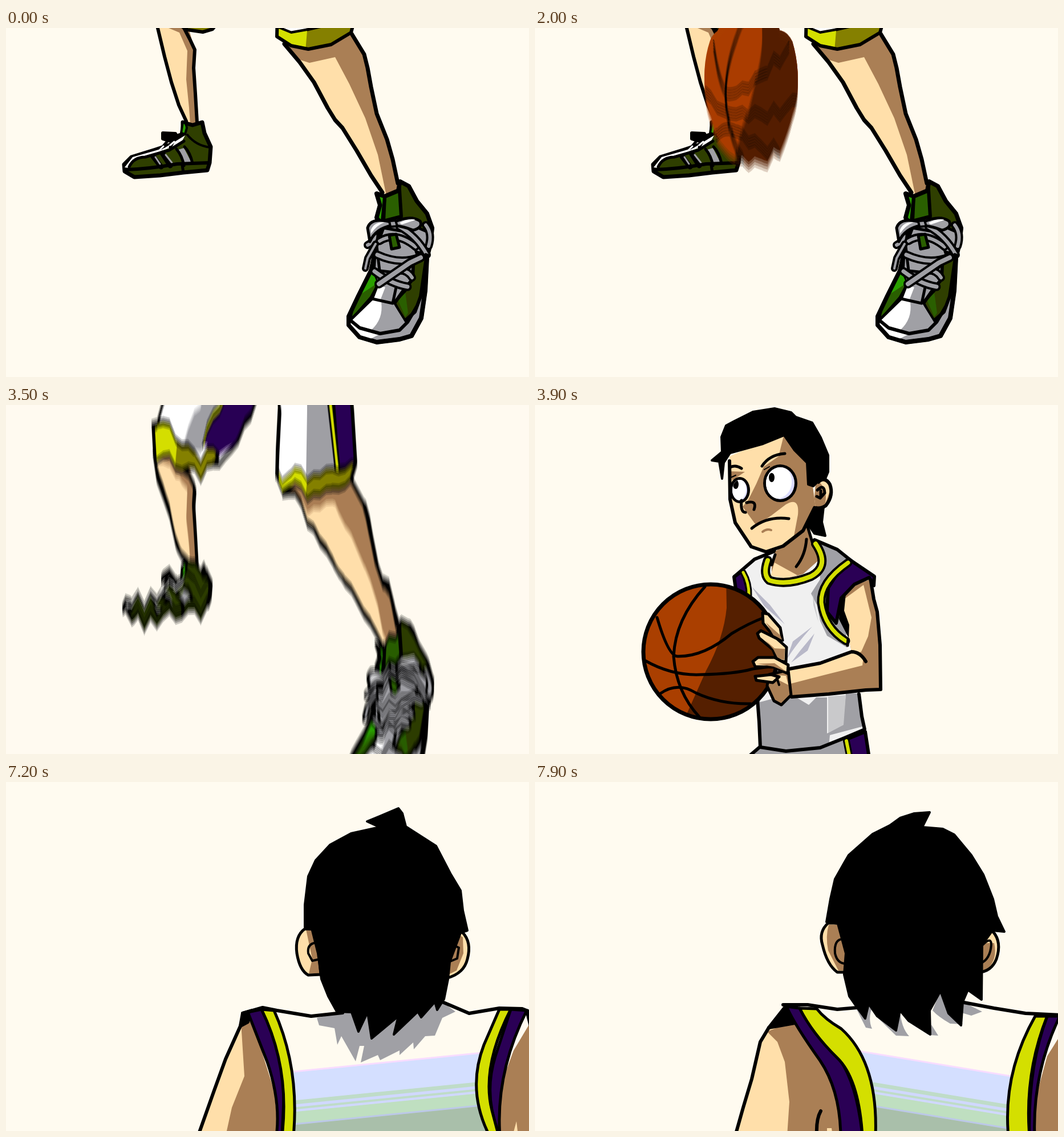
Recreate the animation shown at these times as an HTML page with a canvas. Size 917x611 px, loop 8000 ms.

```html
<!DOCTYPE html>
<html lang="en">
<head>
<meta charset="utf-8">
<title>Dribble</title>
<style>
html, body { margin: 0; width: 100%; height: 100%; overflow: hidden; background: #fffbf0; }
canvas { display: block; width: 100vw; height: 100vh; }
</style>
</head>
<body>
<canvas id="stage" width="917" height="611"></canvas>
<script>
const W = 917, H = 611, PAD = 60, LOOP = 8000, CLIMB = 1000;
const PAPER = "#fffbf0", INK = "#000", SKIN = "#ffdfaa", TAN = "#aa7f55",
  LIME = "#d4df00", OLIVE = "#858000", PURPLE = "#2a0055", GREY = "#a0a0a5",
  MOSS = "#2f3f00", LEAF = "#2a5f00", GRASS = "#2a9f00", RUST = "#aa3f00",
  BROWN = "#551f00", CLOTH = "#f0f0f0", LILAC = "#dcdcff";

const screen = document.getElementById("stage").getContext("2d");
const sheet = document.createElement("canvas");
sheet.width = W;
sheet.height = H + 2 * PAD;
const sheetPen = sheet.getContext("2d");
let g = screen;

function line(d, width = 6, color = INK) {
  g.lineJoin = g.lineCap = "round";
  g.lineWidth = width;
  g.strokeStyle = color;
  g.stroke(new Path2D(d));
}
function flat(d, color) {
  g.fillStyle = color;
  g.fill(new Path2D(d));
}
function shape(d, color, width = 6) {
  flat(d, color);
  line(d, width);
}
function band(d, color, width, edge = 5) {
  line(d, width + 2 * edge);
  line(d, width, color);
}
function oval(x, y, rx, ry, color) {
  g.beginPath();
  g.ellipse(x, y, rx, ry, 0, 0, 7);
  g.fillStyle = color;
  g.fill();
}
function within(d, draw) {
  g.save();
  g.clip(new Path2D(d));
  draw();
  g.restore();
}
function rand(n) {
  const v = Math.sin(n * 127.1 + 11.7) * 43758.5453;
  return v - Math.floor(v);
}

// Vertical speed blur with a ragged edge.
function smear(draw, amp, blur, seed) {
  sheetPen.clearRect(0, 0, W, sheet.height);
  g = sheetPen;
  g.save();
  g.translate(0, PAD);
  draw();
  g.restore();
  g = screen;
  for (let k = 0; k < 5; k++) {
    g.globalAlpha = 1 / (k + 1);
    for (let x = 0; x < W; x++) {
      const cell = Math.floor(x / 11), f = x / 11 - cell;
      const a = rand(cell + seed), b = rand(cell + 1 + seed);
      const y = ((a + (b - a) * f) * 2 - 1) * amp + (k / 2 - 1) * blur;
      g.drawImage(sheet, x, 0, 1, sheet.height, x, y - PAD, 1, sheet.height);
    }
  }
  g.globalAlpha = 1;
}

function shorts() {
  const left = "M395 -400 L330 -250 L268 -100 L258 -82 L261 -32 L296 -10 L318 3 L345 7 L362 2 L405 -50 L437 -118 L460 -190 L470 -400 Z";
  flat(left, "#fff");
  within(left, () => {
    flat("M395 -330 L372 -118 L345 -50 L325 -15 L310 -40 L340 -118 Z", GREY);
    flat("M440 -400 L378 -118 L345 -48 L358 -20 L405 -50 L480 -200 Z", PURPLE);
    line("M430 -300 L378 -118 L347 -48", 8);
    line("M430 -300 L378 -118 L347 -48", 3, LIME);
    shape("M262 -98 L300 -56 L330 -24 L372 -28 L360 30 L250 0 Z", OLIVE, 5);
    flat("M263 -92 L300 -52 L296 -8 L261 -32 L258 -75 Z", LIME);
  });
  line(left);
  const right = "M470 -400 L462 -190 L480 -118 L476 -30 L475 15 L500 31 L530 37 L570 29 L605 8 L613 -22 L607 -118 L578 -430 Z";
  flat(right, "#fff");
  within(right, () => {
    flat("M528 -400 L528 -118 L526 10 L620 10 L578 -430 Z", GREY);
    shape("M548 -430 L575 -118 L583 -15 L616 -25 L607 -118 L578 -430 Z", PURPLE, 5);
    band("M545 -430 L569 -118 L581 -14", LIME, 5, 3);
    shape("M470 -4 L500 8 L528 3 L580 -9 L620 -28 L620 50 L470 50 Z", OLIVE, 5);
    flat("M478 1 L500 10 L528 5 L525 40 L470 40 Z", LIME);
  });
  line(right);
}

function backShoe() {
  const upper = "M310 165 L327 170 L344 165 L348 184 L359 208 L357 236 L353 249 L311 253 L270 258 L225 261 L208 251 L207 239 L220 226 L262 213 L292 203 L310 186 Z";
  shape(upper, MOSS, 7);
  within(upper, () => {
    flat("M208 244 L222 226 L278 210 L314 188 L306 203 L262 219 L230 228 L214 245 Z", "#fff");
    line("M216 243 Q224 226 244 226 L286 214 L312 198", 5);
    flat("M302 213 L312 210 L326 237 L315 240 Z", GREY);
    line("M299 212 Q309 224 312 241 M313 208 Q323 218 327 237", 5);
    line("M258 225 L272 243 M274 219 L288 241", 9);
    line("M262 226 L270 238 M280 222 L291 236", 3, GREY);
    line("M318 187 Q333 206 358 209", 4);
  });
  shape("M310 165 Q316 165 317 175 L314 186 L307 184 Z", GRASS, 4);
  line("M209 248 Q250 247 300 238 L355 236", 6);
  line("M309 240 L311 253", 5);
  shape("M275 184 L297 185 L299 193 L288 198 L275 194 Z", INK, 6);
  line("M294 190 L307 186 M284 197 L273 210 M298 190 L288 209", 5);
  line("M269 214 L276 207 M288 205 L295 199", 3, "#fff");
}

function frontShoe() {
  const body = "M650 290 L664 295 L688 285 L691 269 L706 277 L720 303 L738 325 L747 350 L744 378 L738 402 L735 460 L728 508 L711 539 L690 545 L650 550 L620 541 L601 520 L601 505 L618 469 L640 425 L650 380 L656 340 L650 332 L656 310 Z";
  shape(body, GREY, 8);
  within(body, () => {
    shape("M691 265 L712 278 L742 330 L746 360 L700 340 L688 330 Z", MOSS, 5);
    shape("M664 295 L690 284 L693 330 L662 338 Z", LEAF, 6);
    shape("M648 286 L664 296 L660 338 L645 340 Z", GRASS, 6);
    shape("M648 375 L645 430 L652 450 L640 472 L602 515 L612 470 Z", LEAF, 5);
    flat("M646 390 L642 425 L651 447 L622 466 L634 430 Z", GRASS);
    shape("M715 392 L738 396 L727 470 L717 497 L698 514 L681 482 L700 455 L713 440 Z", MOSS, 6);
    flat("M700 462 L688 478 L700 506 L705 499 Z", LEAF);
    line("M700 460 L680 481 L702 516", 5);
    flat("M602 512 L642 474 L679 482 L700 516 L690 529 L658 536 L620 525 Z", GREY);
    flat("M603 513 L642 474 L658 480 Q662 510 640 529 L615 523 Z", "#fff");
    flat("M652 448 L684 454 L678 481 L642 474 Z", GREY);
    flat("M652 450 L665 454 L656 477 L643 473 Z", "#fff");
    line("M652 448 L642 474 L678 482 L684 454 M642 474 L605 510", 5);
    flat("M600 512 L620 528 L655 536 L632 548 L608 530 Z", "#fff");
    line("M603 511 L620 525 L656 535 L690 529 L704 515 L720 488", 6);
  });
  line(body, 7);
  band("M736 345 Q748 360 741 382", GREY, 6, 4);
  shape("M662 350 L708 358 L722 400 L700 430 L655 425 L650 382 Z", GREY, 5);
  band("M655 373 Q684 355 718 383", GREY, 6, 4);
  band("M651 397 Q690 415 724 402", GREY, 7, 4);
  band("M646 426 Q675 448 704 453", GREY, 7, 4);
  band("M690 423 Q706 426 712 437", GREY, 6, 4);
  band("M654 448 L708 411 L727 402", GREY, 8, 4);
  shape("M672 363 L684 361 L690 384 L676 387 Z", LEAF, 5);
  band("M642 352 Q654 370 634 380", GREY, 6, 4);
  band("M648 378 L634 403 L630 421", GREY, 4, 4);
  band("M690 348 Q720 364 738 397", GREY, 6, 4);
  shape("M676 340 Q640 330 634 350 L638 374 Q648 351 676 346 Z", GREY, 5);
  flat("M640 353 Q646 339 664 340 Q650 345 640 360 Z", "#fff");
  shape("M682 339 Q710 327 726 338 Q732 349 714 354 Q696 347 682 346 Z", GREY, 5);
  flat("M690 341 Q708 332 718 336 Q706 340 694 344 Z", "#fff");
  shape("M672 338 L683 337 L686 347 L674 348 Z", GREY, 4);
  line("M736 397 L741 399", 6);
}

function legs() {
  flat("M258 -40 L265 0 L278 50 L290 95 L303 135 L316 167 L335 168 L330 70 L331 38 L315 0 L318 -10 Z", SKIN);
  flat("M262 -30 L285 0 L304 8 L318 40 L316 90 L321 140 L323 169 L335 168 L330 70 L331 38 L320 0 Z", TAN);
  line("M260 -32 L266 0 L278 50 L290 95 L303 135 L316 163 M310 -4 L322 19 L331 38 L329 70 L332 115 L335 165", 6);
  backShoe();
  const calf = "M486 24 L515 60 L540 95 L565 140 L590 175 L615 215 L640 258 L660 288 L670 292 L688 283 L686 262 L678 228 L668 195 L650 150 L640 100 L628 46 L605 8 Z";
  flat(calf, SKIN);
  within(calf, () => flat("M486 24 L510 54 L532 61 L577 51 L602 98 L630 158 L652 222 L667 294 L700 290 L670 150 L640 0 Z", TAN));
  line("M488 28 L515 60 L540 95 L564 140 L577 161 L590 175 L615 215 L640 258 L660 288 M606 10 L628 46 L634 70 L640 103 L650 150 L668 195 L678 230 L687 272", 7);
  frontShoe();
  shorts();
}

function ball(outline) {
  const round = "M190 432 A118 118 0 1 1 426 432 A118 118 0 1 1 190 432 Z";
  flat(round, RUST);
  within(round, () => {
    flat("M335 300 L336 355 Q331 408 300 465 L262 550 L440 560 L440 300 Z", BROWN);
    line("M298 318 Q246 375 243 440 Q248 503 288 546", 5);
    line("M214 372 Q234 440 250 440 Q296 441 345 400 Q375 382 402 372", 5);
    line("M194 448 Q240 474 290 472 Q350 471 382 462 L428 456", 5);
    line("M220 505 Q250 484 282 504 Q325 524 378 523", 5);
  });
  if (outline) line(round, 7);
}

function hand() {
  shape("M399 364 L409 366 L430 390 L434 412 L418 404 L400 382 Z", SKIN, 5);
  flat("M405 381 L430 403 L433 411 L418 403 Z", TAN);
  shape("M390 400 L396 395 L424 409 L441 424 L440 450 L425 447 L417 428 L393 408 Z", SKIN, 5);
  flat("M404 412 L420 426 L438 427 L437 446 L426 444 L418 428 Z", TAN);
  shape("M410 472 L444 464 L449 508 L432 525 L419 518 L407 492 Z", TAN, 5);
  flat("M425 473 L440 474 L444 490 L428 482 Z", SKIN);
  shape("M382 449 L391 442 L420 442 L444 455 L443 470 L418 459 L386 458 Z", SKIN, 5);
  flat("M390 453 L420 452 L441 467 L418 458 Z", TAN);
  shape("M386 475 L414 472 L428 476 L417 486 L388 482 Z", SKIN, 5);
  line("M424 478 L428 490", 4);
}

function torso() {
  flat("M374 618 L395 598 L540 585 L580 568 L586 618 Z", GREY);
  shape("M547 585 L579 572 L586 618 L552 618 Z", PURPLE, 6);
  band("M546 588 L552 618", LIME, 6, 3);
  line("M395 598 L374 616", 6);
  const shirt = "M350 300 L385 270 L415 257 L490 236 L530 253 L555 273 L545 415 L568 506 L573 545 L578 568 L540 584 L500 600 L440 606 L395 599 L393 555 L390 515 L380 335 Z";
  flat(shirt, CLOTH);
  within(shirt, () => {
    flat("M494 230 L560 272 L548 425 L512 404 L500 378 L494 350 L484 330 L500 305 Z", GREY);
    flat("M386 505 L395 520 L440 508 L455 510 L480 525 L493 512 L512 512 L512 575 L540 560 L545 505 L590 505 L585 560 L517 578 L514 612 L390 612 Z", GREY);
    flat("M514 510 L545 508 L541 560 L514 574 Z", "#c9c9cb");
    flat("M486 388 L452 414 L441 446 Q456 421 486 388 Z M490 400 L465 430 L449 451 L478 430 Z", "#b8b8c8");
    flat("M380 318 L412 350 L438 384 L402 352 Z", "#b8b8c8");
    flat("M487 330 L497 380 L488 350 Z", "#c9c9cb");
  });
  line("M350 300 L385 270 L420 256 M490 236 L530 253 L555 273 M390 515 L393 555 L395 599 M568 506 L573 545 L578 568 L540 584 L500 600 L440 606 L395 599", 6);
  shape("M349 301 L364 290 L376 338 L352 322 Z", PURPLE, 6);
  band("M365 293 Q376 312 375 334", LIME, 5, 3);
}

function arm() {
  const limb = "M550 320 L588 305 L600 355 L605 420 L606 498 L580 498 L515 507 L450 512 L444 462 L500 451 L555 432 L548 395 L536 345 Z";
  flat(limb, TAN);
  within(limb, () => {
    flat("M535 345 L576 315 L590 372 L584 405 L572 432 L548 440 Z", SKIN);
    flat("M440 462 L555 430 L576 440 L574 456 L510 472 L440 490 Z", SKIN);
  });
  line("M588 303 L594 340 L600 362 L605 420 L606 498 L580 499 L515 506 L450 511 M446 462 L500 452 L555 432 Q570 432 580 449", 6);
  flat("M545 330 L535 345 L533 375 L550 408 L551 385 L542 360 Z", INK);
  shape("M552 271 L595 300 L594 316 L586 302 L560 314 L537 338 L528 382 L512 362 L514 320 L534 289 Z", PURPLE, 6);
  band("M549 276 Q500 310 502 346 Q508 390 545 413", LIME, 7, 4);
  line("M549 410 L548 421", 5);
}

function eye(x, y, rx, ry, px, py, lid, skin) {
  oval(x, y, rx + 3, ry + 3, INK);
  g.save();
  g.beginPath();
  g.ellipse(x, y, rx - 2, ry - 2, 0, 0, 7);
  g.clip();
  g.fillStyle = LILAC;
  g.fillRect(x - rx, y - ry, 2 * rx, 2 * ry);
  oval(x - rx * .25, y - ry * .1, rx, ry, "#fff");
  oval(px, py, 5, 8, INK);
  if (lid) {
    const edge = y - ry + 2 * ry * lid;
    g.fillStyle = skin;
    g.fillRect(x - rx, y - ry, 2 * rx, 2 * ry * lid);
    line(`M${x - rx} ${edge} L${x + rx} ${edge}`, 5);
  }
  g.restore();
}

function head(lid) {
  shape("M476 205 L492 180 L506 178 L503 205 L509 229 L490 225 Z", INK, 4);
  const neck = "M422 256 L478 212 L488 240 L497 272 L470 296 L440 304 L415 298 L415 275 Z";
  flat(neck, TAN);
  flat("M420 276 L460 298 L440 304 L413 299 Z", SKIN);
  line("M478 213 L487 243 M421 262 L415 280 M476 235 Q474 263 458 283", 5);
  band("M408 272 Q399 297 411 307 Q442 317 484 300 Q518 282 492 243", LIME, 8, 4);
  flat("M492 137 Q505 126 517 137 Q525 158 509 178 L488 181 Z", TAN);
  flat("M498 134 Q517 132 517 150 L508 176 Q515 152 498 134 Z", SKIN);
  line("M497 135 Q508 124 517 139 Q524 158 510 176 Q500 183 489 179", 6);
  line("M495 149 Q507 137 508 154 L500 163 L494 160 M501 150 L501 160", 5);
  const face = "M341 90 L342 165 L351 206 L379 248 L405 257 L435 247 L470 220 L492 180 L486 135 L470 80 L437 48 Z";
  flat(face, SKIN);
  within(face, () => {
    flat("M437 50 L427 90 L401 108 L388 138 L374 166 L364 178 L388 211 L415 193 L440 174 Q464 160 461 192 L452 240 L500 205 L500 50 Z", TAN);
    flat("M341 116 L368 117 L346 132 Z", TAN);
  });
  line("M341 98 L342 165 L351 206 L379 248 L405 257 L435 247 L470 220 L490 180", 6);
  shape("M310 97 L328 82 L327 56 L335 36 L350 28 L382 12 L420 6 L449 13 L457 21 L486 31 L501 57 L514 88 L514 117 L509 129 L497 133 L488 142 L479 139 L477 101 L455 79 L437 53 L400 68 L342 84 L331 101 L328 129 L323 99 Z", INK, 4);
  eye(359, 149, 15, 20, 352, 139, lid, SKIN);
  eye(430, 137, 27, 30, 415, 127, lid, TAN);
  line("M342 109 Q352 104 362 111 M398 107 Q411 87 438 85", 5);
  line("M341 128 L352 123 M402 113 L411 108", 2);
  line("M362 167 Q360 188 369 188 M371 171 Q390 166 384 183", 5);
  line("M380 216 Q407 194 445 199", 5);
  line("M399 222 Q406 216 414 219", 4, TAN);
}

function player(lid) {
  torso();
  arm();
  head(lid);
  ball(true);
  hand();
}

function world(y) {
  g.fillStyle = PAPER;
  g.fillRect(0, -PAD, W, sheet.height);
  g.save();
  g.translate(0, y);
  legs();
  g.translate(0, -CLIMB);
  player(0);
  g.restore();
}

const backA = {
  shirt: "M470 400 L535 410 L765 388 L865 398 Q817 490 826 545 L848 620 L502 620 Q513 500 470 400 Z",
  stripe: [508, -.1],
  shadow: "M545 413 L605 400 L765 385 L788 402 L765 413 L752 444 L735 445 L715 468 L714 456 L690 478 L690 470 L656 487 L652 478 L622 491 L628 462 L620 462 L613 489 L588 445 L581 460 L576 431 L549 426 Z",
  arms: ["M414 420 L385 485 L365 540 L338 620 L480 620 L470 540 L432 420 Z", "M917 425 L890 470 L864 540 L866 620 L930 620 Z"],
  shade: "M412 420 L432 420 L470 540 L478 620 L385 620 L396 570 L418 515 Z",
  glint: "M895 594 L888 620 L898 620 Z",
  cap: "M415 405 L432 400 L424 420 L411 427 Z",
  sides: [
    ["M424 403 L448 398 Q490 480 488 535 L484 620 L474 620 Q482 560 458 490 Z", PURPLE],
    ["M448 398 L470 400 Q515 500 504 620 L484 620 Q498 500 448 398 Z", LIME],
    ["M885 398 L913 400 Q858 510 866 620 Q836 550 858 480 Z", PURPLE],
    ["M865 398 L885 398 Q833 500 852 575 L864 620 L848 620 Q807 540 838 460 Z", LIME]
  ],
  lines: "M415 405 L450 395 L475 400 L535 410 L590 404 M765 385 L812 405 L865 396 L905 397 L920 403 M412 425 L385 485 L365 540 L338 616 M913 400 L920 428",
  ears: ["M524 257 Q506 270 510 300 Q515 330 530 338 L552 337 L545 258 Z", "M800 263 Q817 280 809 310 Q803 335 774 343 L776 265 Z"],
  lobes: "M526 258 L548 258 L552 335 L531 335 L537 310 Z M790 264 L801 272 L802 300 L790 330 L774 338 Z",
  marks: "M540 282 Q528 285 530 300 L537 313 L546 311 M785 286 L794 290 L791 309 L779 314",
  hair: "M633 69 L655 60 L688 46 L695 55 L701 78 L754 112 L779 160 L797 190 L801 225 L809 260 L797 264 L778 315 L775 345 L768 380 L756 399 L752 385 L728 412 L722 402 L680 442 L688 410 L641 449 L634 403 L618 437 L606 403 L580 402 L565 375 L553 345 L547 300 L536 256 L524 254 L524 215 L530 165 L543 137 L568 110 L605 90 L655 79 Z"
};

const backB = {
  shirt: "M498 398 L560 398 L752 386 L877 410 Q815 520 830 620 L597 620 Q600 480 498 398 Z",
  stripe: [463, .165],
  shadow: "M563 396 L592 392 Q583 415 591 432 L580 430 Z M598 410 L640 400 Q642 430 656 445 L633 444 Z M697 400 L712 362 L750 424 L728 423 Q707 411 697 400 Z M752 386 L784 402 L765 409 L748 404 Z M695 425 L707 444 L692 443 Z",
  arms: ["M410 430 L395 455 L380 520 L365 570 L350 620 L540 620 L530 540 L455 420 Z", "M920 445 L898 480 L876 560 L875 620 L930 620 Z"],
  shade: "M407 437 L455 418 L535 540 L540 620 L442 620 L446 560 L438 490 L425 455 Z",
  glint: "M512 606 L520 606 L522 620 L512 620 Z",
  cap: "M440 392 L410 430 L455 422 L448 398 Z",
  sides: [
    ["M441 393 L464 396 Q490 445 534 485 Q565 530 574 620 L536 620 Q535 540 500 488 Q455 425 441 393 Z", PURPLE],
    ["M464 396 L494 397 Q508 415 537 432 Q602 490 597 620 L574 620 Q568 520 530 483 Q486 440 464 396 Z", LIME],
    ["M898 410 L920 410 Q872 510 876 620 L867 620 Q864 500 898 410 Z", PURPLE],
    ["M877 410 L898 410 Q858 510 867 620 L830 620 Q820 510 877 410 Z", LIME]
  ],
  lines: "M435 390 L478 390 L530 398 L565 395 M752 386 L805 396 L860 405 L920 408 M410 430 L395 455 L380 520 L365 570 L352 616 M501 576 Q493 590 494 616",
  ears: ["M514 247 Q497 262 504 285 Q512 320 530 333 L552 333 L545 247 Z", "M803 262 Q819 280 809 310 Q800 332 778 333 L778 262 Z"],
  lobes: "M515 250 L550 250 L550 330 L532 330 L514 295 Q509 270 515 250 Z M780 282 L805 282 Q812 310 792 329 L780 330 Z",
  marks: "M540 275 Q524 275 526 300 Q530 318 545 318 M785 285 Q800 270 800 285 Q798 310 782 317",
  hair: "M511 245 L518 205 L526 170 L543 140 L550 128 L592 91 L622 76 L640 63 L665 55 L692 53 L679 79 L715 82 L735 92 L765 128 L786 162 L803 205 L810 235 L823 262 L802 260 L784 285 L783 381 L759 364 L750 385 L747 426 L725 405 L711 366 L692 400 L693 442 L655 418 L640 400 L633 435 L600 410 L585 388 L579 414 L565 395 L551 375 L542 337 L545 300 L531 248 Z"
};

const bands = [[-3, 3, "#f8dcff"], [0, 49, "#d4dfff"], [49, 7, "#bfdcc8"], [56, 5, "#d0d8ff"],
  [61, 4, "#bfdcc8"], [65, 4, "#d0d8ff"], [69, 20, "#bfdfc0"], [89, 3, "#bcc8e8"], [92, 90, "#a9bfaa"]];

function backView(p) {
  g.fillStyle = PAPER;
  g.fillRect(0, 0, W, H);
  p.arms.forEach((d, i) => flat(d, i ? TAN : SKIN));
  flat(p.shade, TAN);
  flat(p.glint, SKIN);
  within(p.shirt, () => {
    const [top, slope] = p.stripe;
    g.transform(1, slope, 0, 1, 0, top - slope * 510);
    for (const [y, h, color] of bands) {
      g.fillStyle = color;
      g.fillRect(0, y, W, h + 1);
    }
  });
  flat(p.shadow, GREY);
  shape(p.cap, INK, 6);
  p.sides.forEach(([d, color]) => shape(d, color, 5));
  line(p.lines, 6);
  p.ears.forEach(d => flat(d, SKIN));
  flat(p.lobes, TAN);
  p.ears.forEach(d => line(d, 5));
  line(p.marks, 4);
  shape(p.hair, INK, 4);
}

// Each bounce: ball height, vertical stretch and raggedness.
const bounce = [[108, 1.13, 14], [285, 1.05, 12], [382, .66, 3], [285, 1.05, 12], [108, 1.13, 14]];

function dribble(step) {
  const [y, stretch, rough] = bounce[step];
  smear(() => {
    g.translate(379, y);
    g.scale(.695, stretch);
    g.translate(-308, -432);
    ball(false);
  }, rough, rough * .7, step + 40);
}

const pan = [[118, 17], [410, 24], [720, 24], [930, 14]];

function paint(step) {
  g = screen;
  if (step >= 72) return backView(step % 2 ? backB : backA);
  if (step >= 39) {
    g.fillStyle = PAPER;
    g.fillRect(0, 0, W, H);
    return player({ 49: .5, 50: .95, 51: .5 }[step] || 0);
  }
  if (step >= 35) {
    const [y, rough] = pan[step - 35];
    return smear(() => world(y), rough, rough * .4, step);
  }
  world(0);
  const beat = step % 10;
  if (step >= 10 && step < 30 && beat < 5) dribble(beat);
}

let shown = -1;
const start = performance.now();
function tick() {
  const step = Math.floor((performance.now() - start) % LOOP / 100);
  if (step !== shown) {
    paint(step);
    shown = step;
  }
  requestAnimationFrame(tick);
}
tick();
</script>
</body>
</html>
```
